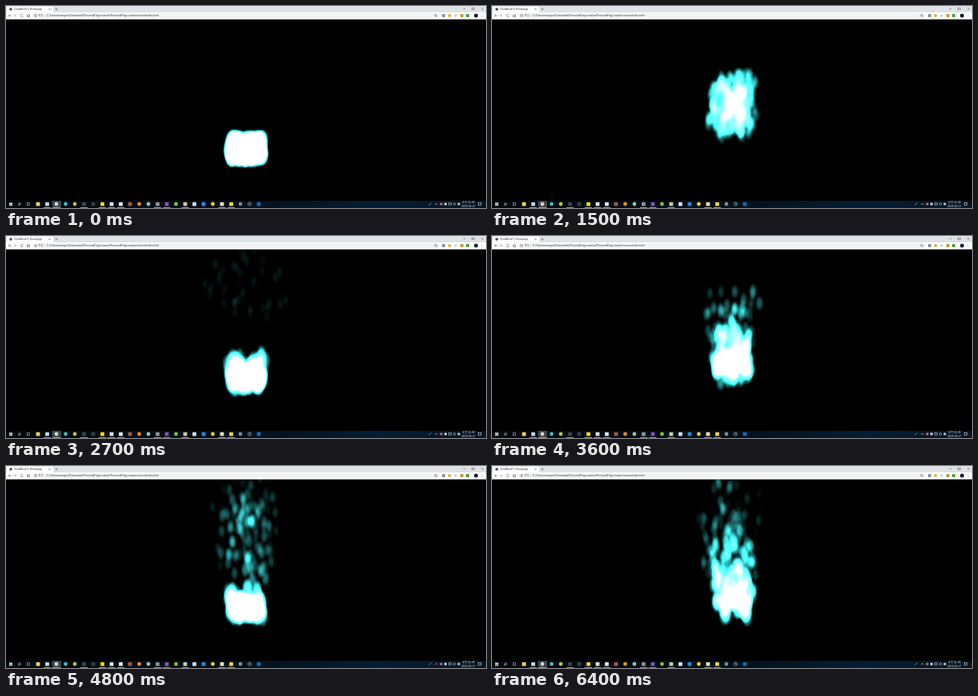
Animation of 600 by 253 pixels, one loop 6500 ms. Source, as an HTML page with a canvas:

```html
<!DOCTYPE html>
<html lang="ko">
<head>
<meta charset="utf-8">
<title>Flame</title>
<style>
html, body { margin: 0; width: 100%; height: 100%; overflow: hidden; background: #000; }
canvas { display: block; width: 600px; height: 253px; }
</style>
</head>
<body>
<canvas id="stage" width="600" height="253"></canvas>
<script>
const ctx = document.getElementById('stage').getContext('2d');
const LOOP = 6500, STEP = 100, COUNT = 350;
const TOP = 17, BOTTOM = 244;
const SANS = '"Liberation Sans", "Noto Sans CJK KR", sans-serif';

function rect(x, y, w, h, color) {
  ctx.fillStyle = color;
  ctx.fillRect(x, y, w, h);
}
function pill(x, y, w, h, r, color) {
  ctx.fillStyle = color;
  ctx.beginPath();
  ctx.roundRect(x, y, w, h, r);
  ctx.fill();
}
function dot(x, y, r, color) {
  ctx.fillStyle = color;
  ctx.beginPath();
  ctx.arc(x, y, r, 0, 7);
  ctx.fill();
}
function ring(x, y, r, color, from = 0, to = 7) {
  ctx.strokeStyle = color;
  ctx.beginPath();
  ctx.arc(x, y, r, from, to);
  ctx.stroke();
}
function line(color, ...pts) {
  ctx.strokeStyle = color;
  ctx.beginPath();
  for (let i = 0; i < pts.length; i += 2) ctx.lineTo(pts[i], pts[i + 1]);
  ctx.stroke();
}
function text(s, x, y, size, color, align = 'left') {
  ctx.font = `${size}px ${SANS}`;
  ctx.textAlign = align;
  ctx.textBaseline = 'middle';
  ctx.fillStyle = color;
  ctx.fillText(s, x, y);
}

function drawBrowser() {
  const ink = '#5f6368';
  ctx.lineWidth = 0.6;
  rect(0, 0, 600, 8, '#dee1e6');
  pill(1, 0.8, 58, 8, [2, 2, 0, 0], '#fff');
  rect(0, 8, 600, 8, '#fff');
  rect(0, 16, 600, 1, '#b4b6b8');
  dot(6, 4, 1.8, '#4a4d50');
  text("CloudNook7's Homepage", 10, 4.2, 3.1, '#333');
  line(ink, 53.5, 3, 55.5, 5);
  line(ink, 55.5, 3, 53.5, 5);
  line(ink, 61.5, 4, 64.5, 4);
  line(ink, 63, 2.5, 63, 5.5);

  ctx.lineWidth = 0.4;
  line('#333', 571.5, 3.5, 574.5, 3.5);
  ctx.strokeRect(582.6, 2.2, 2.6, 2.6);
  line('#333', 594.3, 2.2, 596.9, 4.8);
  line('#333', 596.9, 2.2, 594.3, 4.8);

  ctx.lineWidth = 0.6;
  line(ink, 5, 10.3, 3.2, 12, 5, 13.7);
  line(ink, 3.2, 12, 7, 12);
  line('#a0a3a6', 11, 10.3, 12.8, 12, 11, 13.7);
  line('#a0a3a6', 9, 12, 12.8, 12);
  ring(20, 12, 1.7, ink, 0.3, 5.6);
  line(ink, 26, 12, 28, 10.2, 30, 12);
  ctx.strokeRect(26.7, 12, 2.6, 1.8);

  pill(33, 9.3, 509, 5.6, 2.8, '#f1f3f4');
  ring(37, 12, 1.4, ink);
  text('파일', 40.5, 12.1, 3.3, ink);
  rect(48.8, 10.5, 0.4, 3, '#bbb');
  text('C:/Users/maruyon/Downloads/PersonalPage-master/PersonalPage-master/source/index.html',
    51, 12.2, 3.4, '#3c4043');
  ring(537, 11.7, 1.3, ink);
  line(ink, 538, 12.7, 539, 13.7);

  pill(545, 10, 4, 4, 0.8, '#8f949b');
  dot(554.5, 12, 2, '#d7b637');
  dot(562, 12, 1.8, '#c9ced4');
  pill(567.8, 10, 4, 4, 0.8, '#b8a13b');
  pill(575, 10, 4, 4, 0.8, '#55a045');
  dot(587.5, 12, 2.5, '#17233a');
  for (let i = -1; i < 2; i++) dot(595, 12 + i * 1.4, 0.45, ink);
}

function drawTaskbar() {
  const g = ctx.createLinearGradient(0, 0, 600, 0);
  g.addColorStop(0, '#04090e');
  g.addColorStop(0.5, '#03101a');
  g.addColorStop(0.78, '#041d34');
  g.addColorStop(1, '#061522');
  rect(0, BOTTOM, 600, 9, g);
  ctx.lineWidth = 0.6;

  for (let i = 0; i < 4; i++) rect(4 + i % 2 * 2.1, 246.3 + (i >> 1) * 2.1, 1.8, 1.8, '#e8edf0');
  ring(17, 248, 1.3, '#ddd');
  line('#ddd', 16.1, 249, 15, 250.2);
  ctx.strokeStyle = '#bbb';
  ctx.strokeRect(26.3, 246.7, 3, 3);
  rect(57.5, BOTTOM, 11.5, 9, '#39464f');

  // One plain shape per app: colour, then "o" for round, "_" for running.
  const apps = ['#f0cf68', '#b9d7e8 _', '#d9cfc4 o_', '#48b6bd o', '#b4c24b o', '#3b4248 _',
    '#353c42', '#f6d813 _', '#d8e0e4 _', '#e5e6e8 _', '#a4584a', '#e78a2c o', '#8bc9a2 o',
    '#87939b _', '#8057b0 _', '#8dbb3f o', '#c6c9aa _', '#d5dfe8', '#2c86d2', '#e6cf35 o',
    '#ecdcb0 _', '#efd42d _', '#7e8790 o', '', '#1769ba'];
  apps.forEach((app, i) => {
    const x = 40 + i * 11.5;
    const [color, flags = ''] = app.split(' ');
    if (!color) {
      ring(x, 248, 2.1, '#c8d0d6');
      line('#c8d0d6', x, 246.8, x, 248, x + 1, 248.4);
    } else if (flags.includes('o')) dot(x, 248, 2.4, color);
    else pill(x - 2.4, 245.7, 4.8, 4.7, 0.5, color);
    if (flags.includes('_')) rect(x - 4.5, 252, 9, 1, '#5ea9da');
  });

  line('#cfd6da', 528.5, 249.5, 531.5, 246.5);
  line('#ddd', 536.3, 248.8, 538, 247.2, 539.7, 248.8);
  pill(542.5, 246.5, 3, 3, 0.4, '#c56d62');
  pill(547.8, 246.5, 3.2, 3, 0.4, '#c9ced2');
  ctx.strokeStyle = '#ccd3d7';
  ctx.strokeRect(553.3, 246.7, 3.4, 2.4);
  ring(560.5, 248, 1.4, '#ccd3d7');
  pill(564.5, 246.5, 3, 3, 0.4, '#b9c2c8');
  text('오전 11:39', 578, 246.5, 3.4, '#e4e8ea', 'center');
  text('2019-06-17', 578, 250.7, 3.4, '#e4e8ea', 'center');
  ctx.strokeStyle = '#d5dadd';
  ctx.strokeRect(590.5, 246.3, 3.4, 3);
}

function makeGlow() {
  const c = document.createElement('canvas');
  c.width = c.height = 32;
  const p = c.getContext('2d');
  const g = p.createRadialGradient(16, 16, 0, 16, 16, 16);
  g.addColorStop(0, 'rgba(68,255,255,1)');
  g.addColorStop(0.45, 'rgba(68,255,255,.75)');
  g.addColorStop(1, 'rgba(68,255,255,0)');
  p.fillStyle = g;
  p.fillRect(0, 0, 32, 32);
  return c;
}

function seeded(seed) {
  let a = seed * 2654435761 | 0;
  return () => {
    a = a + 0x6D2B79F5 | 0;
    let t = Math.imul(a ^ a >>> 15, 1 | a);
    t = t + Math.imul(t ^ t >>> 7, 61 | t) ^ t;
    return ((t ^ t >>> 14) >>> 0) / 4294967296;
  };
}

const glow = makeGlow();

// Every spark starts at once, speeds upward, fades and is reborn at the base.
function drawSpark(i, time) {
  const rnd = seeded(i + 1);
  const span = (a, b) => a + (b - a) * rnd();
  let age = time, p;
  for (;;) {
    p = { x: span(-21.5, 21.5), y: span(-11, 11), ax: span(-5, 5), ay: span(11, 38), life: span(1.85, 3) };
    if (age < p.life) break;
    age -= p.life;
  }
  const left = 1 - age / p.life, push = age * age;
  const rx = 4 + 3.5 * left, ry = rx * 1.85;
  ctx.globalAlpha = left;
  ctx.drawImage(glow, 300 + p.x + p.ax * push - rx, 178.5 + p.y - p.ay * push - ry, rx * 2, ry * 2);
}

function drawFlame(time) {
  rect(0, TOP, 600, BOTTOM - TOP, '#000');
  ctx.save();
  ctx.beginPath();
  ctx.rect(0, TOP, 600, BOTTOM - TOP);
  ctx.clip();
  ctx.globalCompositeOperation = 'lighter';
  for (let i = 0; i < COUNT; i++) drawSpark(i, time);
  ctx.restore();
}

drawBrowser();
drawTaskbar();

let shown = -1;
const start = performance.now();
function tick() {
  const step = Math.floor((performance.now() - start) % LOOP / STEP);
  if (step !== shown) {
    shown = step;
    drawFlame(step * STEP / 1000);
  }
  requestAnimationFrame(tick);
}
tick();
</script>
</body>
</html>
```
